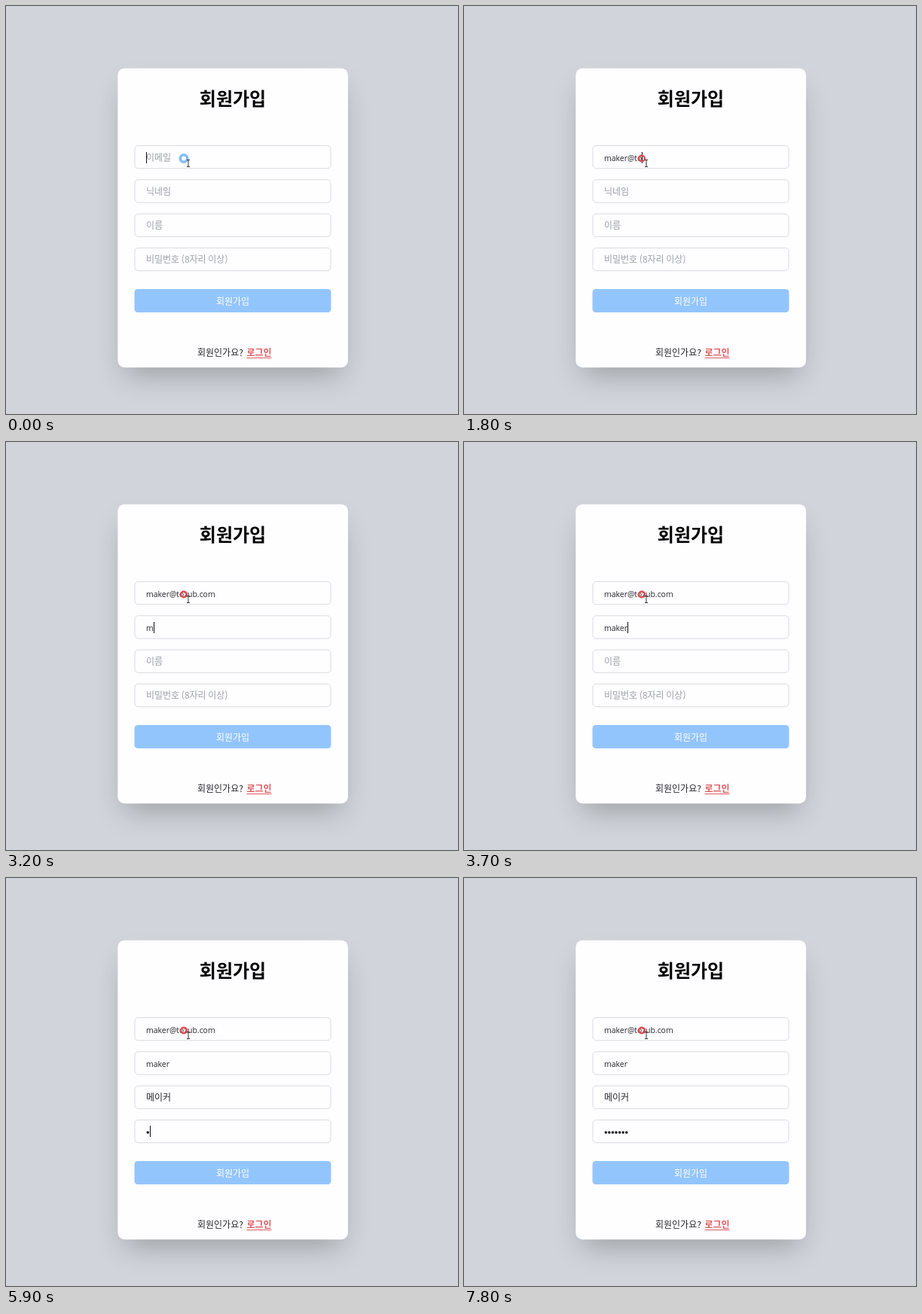
Recreate the animation shown at these times as an HTML page with a canvas. Size 600 by 542 pixels, loop 8 s.

```html
<!DOCTYPE html>
<html lang="ko">
<head>
<meta charset="utf-8">
<title>회원가입</title>
<style>
  html, body { margin: 0; width: 100%; height: 100%; overflow: hidden; background: #d1d5db; }
  canvas { display: block; width: 600px; height: 542px; }
</style>
</head>
<body>
<canvas></canvas>
<script>
const LOOP = 8000, LEFT = 171, WIDTH = 260, ROW_TOP = 185.5, ROW_STEP = 45.3, TEXT_X = 186;
const HANGUL = '"Noto Sans CJK KR", "Noto Sans CJK JP", "Noto Sans CJK", sans-serif';
const KO = `12px ${HANGUL}`, KO_BOLD = `bold 12px ${HANGUL}`, TITLE = `bold 24px ${HANGUL}`;
const LATIN = '10.45px "Open Sans", "Noto Sans", sans-serif';
const INK = '#25272c', BULLET_STEP = 4.57;

const prefixes = word => [...word].map((_, i) => word.slice(0, i + 1));

// Each field shows states[i] from times[i] on and takes the focus at `focus`.
const fields = [
  { hint: '이메일', font: LATIN, focus: 0, states: prefixes('maker@tozub.com'),
    times: [500, 600, 900, 1000, 1100, 1500, 1500, 1700, 2000, 2300, 2400, 2500, 2500, 2700, 2800] },
  { hint: '닉네임', font: LATIN, focus: 2900, states: prefixes('maker'),
    times: [3200, 3300, 3500, 3600, 3700] },
  { hint: '이름', font: KO, focus: 4000, composing: true,
    states: ['ㅁ', '메', '멩', '메이', '메잌', '메이커'],
    times: [4600, 4700, 4800, 4900, 5000, 5100] },
  { hint: '비밀번호 (8자리 이상)', secret: true, focus: 5400, states: prefixes('•••••••'),
    times: [5900, 6100, 6300, 6500, 6700, 6900, 7300] },
];

const canvas = document.querySelector('canvas');
const ctx = canvas.getContext('2d');
const ratio = window.devicePixelRatio || 1;
canvas.width = 600 * ratio;
canvas.height = 542 * ratio;
ctx.scale(ratio, ratio);

function roundBox(x, y, w, h, r, fill, stroke) {
  ctx.beginPath();
  ctx.roundRect(x, y, w, h, r);
  if (fill) { ctx.fillStyle = fill; ctx.fill(); }
  if (stroke) { ctx.strokeStyle = stroke; ctx.lineWidth = 1; ctx.stroke(); }
}

function rect(x, y, w, h, color) {
  ctx.fillStyle = color;
  ctx.fillRect(x, y, w, h);
}

function text(str, x, y, font, color, align = 'left') {
  ctx.font = font;
  ctx.fillStyle = color;
  ctx.textAlign = align;
  ctx.fillText(str, x, y);
  return ctx.measureText(str).width;
}

function ring(radius, width, color) {
  ctx.beginPath();
  ctx.arc(236, 202.5, radius, 0, Math.PI * 2);
  ctx.lineWidth = width;
  ctx.strokeStyle = color;
  ctx.stroke();
}

function drawCard() {
  rect(0, 0, 600, 542, '#d1d5db');
  ctx.save();
  ctx.shadowColor = 'rgba(0,0,0,.25)';
  ctx.shadowBlur = 37 * ratio;
  ctx.shadowOffsetY = 19 * ratio;
  roundBox(157, 92, 288, 379, 6, '#fff');
  ctx.restore();
  roundBox(148.3, 82.7, 305.7, 397.5, 9, '#fefdff');
  text('회원가입', 301, 132, TITLE, '#000', 'center');
  roundBox(170.5, 376, 261, 31, 4.5, '#93c5fd');
  text('회원가입', 301, 396.5, KO, '#fff', 'center');
  text('회원인가요?', 254, 465, KO, '#25272c');
  text('로그인', 319.5, 465, KO_BOLD, '#e05a5e');
  rect(319.5, 467, 33, 1, '#e05a5e');
}

function drawBullets(count, y) {
  ctx.fillStyle = '#111';
  for (let i = 0; i < count; i++) {
    ctx.beginPath();
    ctx.arc(TEXT_X + BULLET_STEP * (i + 0.5), y, 1.75, 0, Math.PI * 2);
    ctx.fill();
  }
  return count * BULLET_STEP;
}

function drawField(field, index, time) {
  const top = ROW_TOP + index * ROW_STEP;
  const value = field.states[field.times.filter(at => at <= time).length - 1] || '';
  const next = fields[index + 1];
  const focused = time >= field.focus && (!next || time < next.focus);
  let width = 0;

  roundBox(LEFT, top, WIDTH, 30.3, 4.5, null, '#d9dae3');
  if (!value) text(field.hint, TEXT_X, top + 20, KO, '#9ca0a8');
  else if (field.secret) width = drawBullets(value.length, top + 16.6);
  else width = text(value, TEXT_X, top + 20, field.font, INK);

  if (!focused) return;
  if (field.composing && value) rect(TEXT_X + width - 11, top + 21.5, 11, 1, INK);
  if (time < 7800) rect(Math.round(TEXT_X + width), Math.round(top + 8), 1, 15, '#111');
}

function drawPointer(time) {
  if (time < 100) ring(4.7, 3.6, '#85bdf8');
  else ring(3.9, 2.4, '#e2474e');
  rect(241.5, 204.5, 1, 9, '#333');
  rect(240, 204, 4, 1, '#333');
  rect(240, 213, 4, 1, '#333');
}

function draw(now) {
  const time = now % LOOP;
  drawCard();
  fields.forEach((field, i) => drawField(field, i, time));
  drawPointer(time);
}

const start = performance.now();
function frame() {
  draw(performance.now() - start);
  requestAnimationFrame(frame);
}
frame();
</script>
</body>
</html>
```
